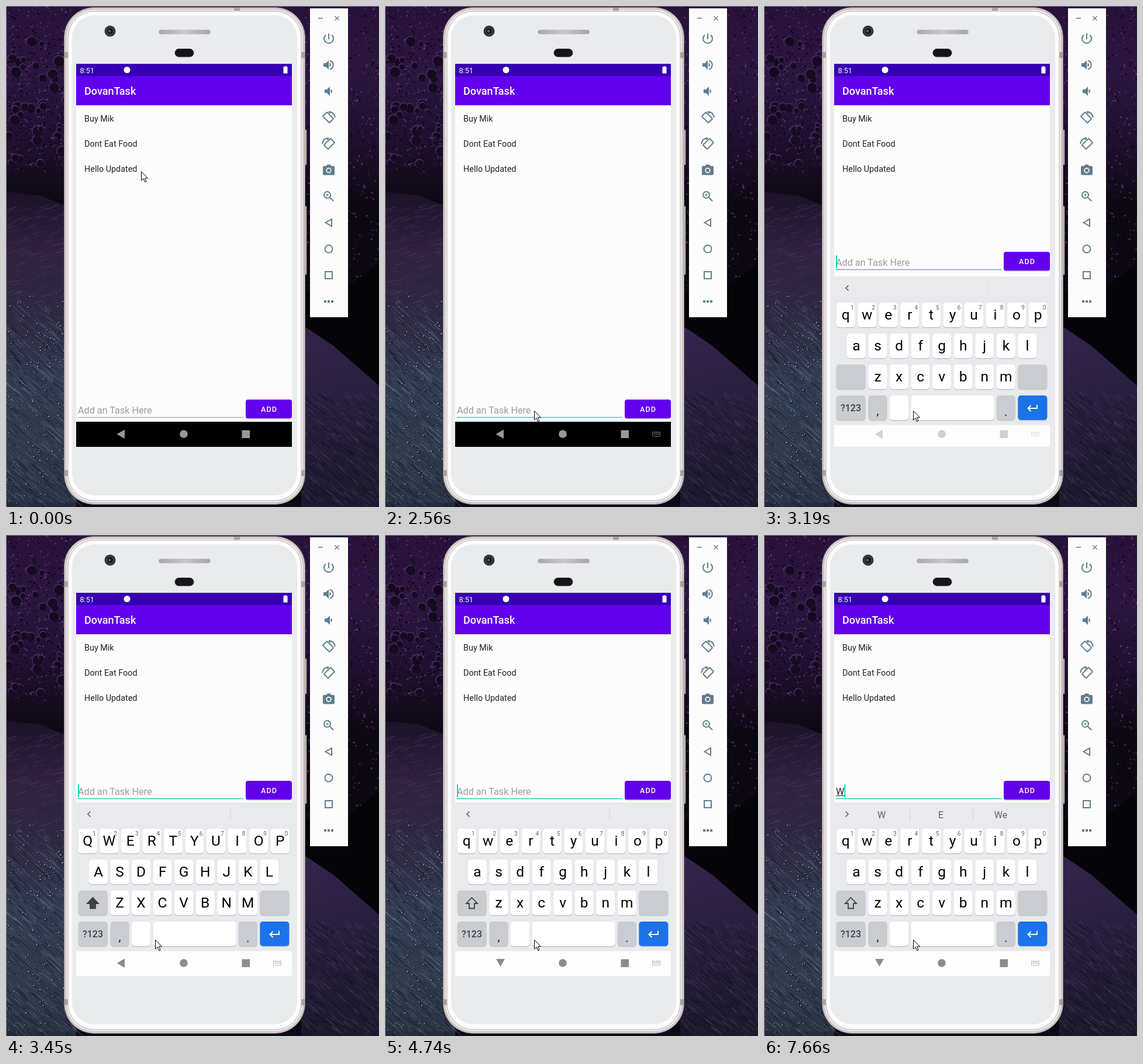
An HTML page with a canvas that plays this animation: 638 by 858 pixels, repeating every 8000 ms.

```html
<!DOCTYPE html>
<html lang="en">
<head>
<meta charset="utf-8">
<title>To-do app in a phone emulator</title>
<style>
html, body { margin: 0; width: 100%; height: 100%; overflow: hidden; background: #150c20; }
canvas, svg { position: absolute; left: 0; top: 0; width: 638px; height: 858px; }
svg { font-family: Roboto, sans-serif; }
.mid { text-anchor: middle; }
.list { font-size: 14.4px; fill: #212121; }
.letter { font-size: 24.5px; fill: #000; }
.digit { font-size: 10px; fill: #5f6368; }
.key { fill: #fff; }
.alt { fill: #caccd2; }
.go { fill: #1a73e8; }
.shadow { fill: #c3c5c9; }
.ghost .board, .ghost .shadow, .ghost .strip-line { opacity: 0; }
.ghost .key { fill: #000; opacity: .13; }
.ghost .digit { fill: #0b0b0b; }
.ghost .chevron { opacity: .3; }
.line { fill: none; stroke: #607d8b; stroke-width: 2; }
.solid { fill: #607d8b; }
</style>
</head>
<body>
<canvas id="wall" width="638" height="858"></canvas>
<svg viewBox="0 0 638 858">
  <defs>
    <linearGradient id="grille"><stop stop-color="#aaa6ad"/><stop offset=".5" stop-color="#c9c8cf"/><stop offset="1" stop-color="#a5a3a8"/></linearGradient>
    <clipPath id="screen"><rect x="120" y="99" width="369" height="656"/></clipPath>
  </defs>

  <g id="phone">
    <path d="M511 212h3v60h-3zM511 343h3v117h-3z" fill="#d8d3d2" stroke="#777174"/>
    <rect x="99.5" y="2.5" width="412" height="851" rx="51" fill="#d5cfcd" stroke="#8c8584"/>
    <rect x="102.5" y="5.5" width="406" height="845" rx="48" fill="#eeeaea" stroke="#c0b8b6"/>
    <path d="M100 79h6v10h-6zM505 79h6v10h-6zM100 795h6v10h-6zM505 795h6v10h-6zM390 3h10v5h-10z" fill="#a7a1a0"/>
    <rect x="106" y="9" width="399" height="838" rx="45" fill="#fdfdfd" stroke="#b9b1af"/>
    <rect x="113" y="16" width="385" height="822" rx="38" fill="#e9ebec"/>
    <circle cx="178" cy="43" r="9.5" fill="#30343a"/>
    <circle cx="178" cy="43" r="6" fill="#15181d" stroke="#555b64"/>
    <circle cx="177" cy="43" r="2.2" fill="#53647c"/>
    <rect x="261" y="40.5" width="89" height="8" rx="4" fill="url(#grille)" stroke="#d9d9db"/>
    <rect x="289" y="73.5" width="32" height="13.5" rx="6.7" fill="#14141a" stroke="#343238"/>
  </g>

  <g clip-path="url(#screen)">
    <path d="M120 99h369v656H120z" fill="#fcfcfc"/>
    <path d="M120 99h369v21H120z" fill="#3700b3"/>
    <path d="M120 120h369v50H120z" fill="#6200ee"/>
    <g fill="#fff">
      <text x="126.5" y="114.5" font-size="12.6">8:51</text>
      <circle cx="207" cy="109.5" r="5.5"/>
      <path d="M476.500 103h3v1.300h2v11.200h-7v-11.200h2z"/>
      <text x="134" y="152" font-size="18" font-weight="500">DovanTask</text>
    </g>
    <g class="list">
      <text x="134" y="197.500">Buy Mik</text>
      <text x="134" y="240.500">Dont Eat Food</text>
      <text x="134" y="283.500">Hello Updated</text>
    </g>

    <g id="field" font-size="16.2">
      <text id="hint" x="123" y="444.500" fill="#9c9c9c">Add an Task Here</text>
      <text id="typed" x="123" y="444.500" fill="#212121"></text>
      <path id="spell" stroke="#212121"/>
      <path id="underline" d="M123 451.500H406"/>
      <rect id="caret" y="427" width="2" height="22" fill="#03dac5"/>
      <rect x="410" y="422" width="79" height="32.500" rx="4" fill="#b9b5c4"/>
      <rect x="410" y="421" width="79" height="32" rx="4" fill="#6200ee"/>
      <text class="mid" x="450" y="441.500" font-size="12.6" font-weight="500" letter-spacing="1.1" fill="#fff">ADD</text>
    </g>

    <path id="navbar" d="M120 712h369v43H120z"/>
    <g id="keyboard">
      <path class="board" d="M120 458h369v254.500H120z" fill="#e8eaed"/>
      <path class="chevron" id="chevron" fill="none" stroke="#5f6368" stroke-width="1.700"/>
      <path class="strip-line" id="dividers" stroke="#d0d2d6"/>
      <g id="words" font-size="16" fill="#5f6368">
        <text class="mid" x="201" y="484.500"></text>
        <text class="mid" x="302.500" y="484.500"></text>
        <text class="mid" x="405" y="484.500"></text>
      </g>
      <g id="keys"></g>
      <path id="shift" d="M148.500 621l9.500 10h-5v8.500h-9V631h-5z" stroke="#3c4043" stroke-width="1.800"/>
      <text class="mid" x="148.500" y="689" font-size="16" font-weight="500" fill="#3c4043">?123</text>
      <path d="M467 678v6H452M456.500 679l-5 5 5 5" fill="none" stroke="#fff" stroke-width="1.900"/>
    </g>
    <g id="navicons">
      <path id="back"/>
      <circle cx="304" cy="733" r="6.800"/>
      <path d="M403.500 726.500h13.500v13.500h-13.500z"/>
    </g>
    <path id="switcher" d="M457 730h14M457 733h14M457 736h2M461 737h7M469 736h2" stroke-width="1.500" stroke-dasharray="2 1"/>
  </g>

  <g id="toolbar">
    <path d="M520 4h65v529h-65z" fill="#fcfcfc"/>
    <path class="line" stroke-width="1.500" d="M534 21h8M562.500 17.500l7 7m0-7l-7 7" style="stroke-width:1.400"/>
    <path class="line" d="M552 47v10M547 49.500a8 8 0 1 0 10 0"/>
    <g id="speaker"><path class="solid" d="M543 98h4l5-5v16l-5-5h-4z"/><path class="solid" d="M553.500 97q5 4 0 8z"/></g>
    <path class="line" d="M554 93.500a7.800 7.800 0 0 1 0 15"/>
    <use href="#speaker" x="2" y="45"/>
    <g id="rotate" class="line">
      <rect x="-5" y="-8" width="10" height="16" rx="1" transform="translate(551 191) rotate(-45)"/>
      <path d="M552 181q9 0 11 10M552 181l3 3"/>
    </g>
    <use href="#rotate" transform="translate(1104 45) scale(-1 1)"/>
    <path class="solid" d="M544 274h3.500l2-2.500h5l2 2.500h3.500q2 0 2 2v11.500q0 2-2 2h-16q-2 0-2-2V276q0-2 2-2z"/>
    <circle cx="552" cy="281.500" r="3.800" fill="#607d8b" stroke="#fcfcfc" stroke-width="1.700"/>
    <path class="line" d="M554 328l6 6"/>
    <circle class="line" cx="549.500" cy="323.500" r="5.500"/>
    <path class="line" style="stroke-width:1.200" d="M547 323.500h5m-2.500-2.500v5"/>
    <path class="line" d="M557 365v12l-10.500-6z"/>
    <circle class="line" cx="552" cy="416" r="6.500"/>
    <path class="line" d="M546 455h12v12h-12z"/>
    <path class="solid" d="M544 504h4v4h-4zM550 504h4v4h-4zM556 504h4v4h-4z"/>
  </g>

  <path id="cursor" d="M.5.5v15.500l3.600-3.400 2.600 6 2.300-1-2.500-5.800h5z" fill="#fff" stroke="#000"/>
</svg>

<script>
const $ = id => document.getElementById(id);
const set = (id, attrs) => { for (const name in attrs) $(id).setAttribute(name, attrs[name]); };

function paintWall() {
  const c = $('wall').getContext('2d');
  let seed = 7;
  const rnd = (a = 0, b = 1) => {
    seed = (seed * 16807) % 2147483647;
    return a + (b - a) * seed / 2147483647;
  };
  const area = (points, fill) => {
    c.beginPath();
    points.forEach(p => c.lineTo(...p));
    c.fillStyle = fill;
    c.fill();
  };
  const fade = (x0, y0, x1, y1, ...colours) => {
    const g = c.createLinearGradient(x0, y0, x1, y1);
    colours.forEach((colour, i) => g.addColorStop(i / (colours.length - 1), colour));
    return g;
  };
  const dot = (x, y, r, colour) => {
    c.beginPath();
    c.arc(x, y, r, 0, 7);
    c.fillStyle = colour;
    c.fill();
  };
  const streaks = (count, x0, x1, y0, y1, slope, colour) => {
    c.strokeStyle = colour;
    for (let i = 0; i < count; i++) {
      const x = rnd(x0, x1), y = rnd(y0, y1), w = rnd(4, 22);
      c.lineWidth = rnd(.4, 1.3);
      c.beginPath();
      c.moveTo(x, y);
      c.lineTo(x + w, y + w * slope);
      c.stroke();
    }
  };

  area([[0, 0], [638, 0], [638, 858], [0, 858]], fade(0, 0, 0, 340, '#28123a', '#2b1640', '#211030', '#0c0812'));
  // foam on both sides
  for (let i = 0; i < 1500; i++) {
    const right = i % 2, x = right ? rnd(512, 638) : rnd(0, 115);
    dot(x, rnd(0, right ? 480 : 290), rnd(.4, 1.8), rnd() < .5 ? '#0d0715' : `hsla(${rnd(272, 292)},40%,${rnd(25, 52)}%,.6)`);
  }
  for (let i = 0; i < 45; i++) {
    const x = rnd(0, 105), y = rnd(60, 275), r = rnd(2, 9);
    dot(x, y, r + 1, '#4a2c62');
    dot(x + .5, y + .8, r, '#160b20');
  }
  // wet metal, lower left
  area([[0, 318], [60, 325], [120, 350], [120, 858], [0, 858]],
    fade(0, 320, 30, 858, '#1c1229', '#30213f', '#2d2840', '#323c50', '#303b4d', '#293344'));
  streaks(170, -10, 115, 340, 510, -.32, 'rgba(105,80,140,.3)');
  streaks(520, -10, 115, 500, 858, .9, 'rgba(125,143,168,.33)');
  streaks(300, -10, 115, 540, 858, .9, 'rgba(8,12,24,.5)');
  for (let i = 0; i < 260; i++) {
    const x = rnd(0, 110), y = rnd(490, 858), r = rnd(.5, 2.4);
    dot(x, y, r, '#151c2a');
    dot(x - .5, y - .5, r * .5, '#a9b8cb');
  }
  // dark gap and brushed surface, lower right
  area([[505, 490], [580, 485], [638, 440], [638, 660], [505, 545]], '#050409');
  area([[505, 545], [560, 582], [638, 650], [638, 858], [505, 858]],
    fade(512, 560, 600, 858, '#33244d', '#2b2040', '#221b34', '#1b1b2c'));
  streaks(260, 500, 638, 660, 858, .85, 'rgba(105,94,145,.32)');
  streaks(150, 500, 638, 660, 858, .85, 'rgba(5,4,14,.5)');
  area([[0, 850], [638, 850], [638, 858], [0, 858]], 'rgba(20,20,35,.25)');
  c.fillStyle = '#8b878d';
  c.fillRect(0, 0, 1, 858);
  c.fillRect(0, 0, 638, 1);
}

function buildKeys() {
  const pitch = 36.55;
  let out = '';
  const key = (x, y, w, kind = '') => {
    out += `<rect class="shadow" x="${x}" y="${y + 1}" width="${w}" height="42.5" rx="5"/>
      <rect class="key ${kind}" x="${x}" y="${y}" width="${w}" height="42" rx="5"/>`;
  };
  [['qwertyuiop', 123.7], ['asdfghjkl', 142], ['zxcvbnm', 178.5]].forEach(([letters, left], row) => {
    const y = 503 + row * 53;
    [...letters].forEach((letter, i) => {
      const x = left + i * pitch;
      key(x, y, 32);
      out += `<text class="letter mid" data-letter="${letter}" x="${x + 16}" y="${y + 29}">${letter}</text>`;
      if (!row) out += `<text class="digit mid" x="${x + 27}" y="${y + 11.5}">${(i + 1) % 10}</text>`;
    });
  });
  key(123.7, 609, 50, 'alt');
  key(434.4, 609, 50, 'alt');
  key(123.7, 662, 50, 'alt');
  key(178.5, 662, 32, 'alt');
  key(215, 662, 32);
  key(251.6, 662, 142);
  key(397.8, 662, 32, 'alt');
  key(434.4, 662, 50, 'go');
  out += '<g font-size="21" fill="#202124"><text class="mid" x="194.5" y="695">,</text><text class="mid" x="413.8" y="697">.</text></g>';
  $('keys').innerHTML = out;
}

// Each track lists [start time, value...]; a value holds until the next start.
const cursorTrack = [[0, 231, 283], [140, 229, 460], [290, 273, 656], [540, 273, 688], [790, 273, 689],
  [940, 271, 689], [1090, 265, 693], [1490, 260, 693], [1630, 259, 693], [1880, 258, 693], [2030, 255, 693]];
const textTrack = [[0, ''], [3870, 'N'], [4740, ''], [7410, 'W']];
const wordTrack = [[0, ''], [4250, 'N No Not'], [4740, ''], [7660, 'W E We']];
const caretToggles = [2150, 2560, 3070, 3590, 3870, 5240, 5670, 6170, 6730, 7130, 7410];
const at = (track, t) => track.findLast(step => step[0] <= t).slice(1);
const letters = () => document.querySelectorAll('[data-letter]');

function draw(t) {
  const [text] = at(textTrack, t), [words] = at(wordTrack, t);
  const focused = t >= 2150, raised = t >= 3070, ghost = raised && t < 3190;
  const settled = t >= 3330, caps = t >= 3450 && t < 3990;
  const caretOn = caretToggles.filter(start => start <= t).length % 2;

  set('cursor', { transform: `translate(${at(cursorTrack, t)})` });
  set('field', { transform: `translate(0 ${raised ? 0 : 253})` });
  $('hint').style.display = text ? 'none' : '';
  $('typed').textContent = text;
  const width = text ? $('typed').getComputedTextLength() : 0;
  set('caret', { x: 123 + width, visibility: caretOn ? 'visible' : 'hidden' });
  set('spell', { d: words ? `M123 446.500h${width}` : '' });
  set('underline', { stroke: focused ? '#2bcfc0' : '#949494', 'stroke-width': focused ? 1.6 : 1 });

  set('keyboard', {
    class: ghost ? 'ghost' : '',
    visibility: raised ? 'visible' : 'hidden',
    transform: `translate(0 ${ghost ? 217 : settled ? 0 : 5})`
  });
  set('chevron', { d: words ? 'M139.500 473.500l4.500 4.500-4.500 4.500' : 'M144.500 473.500l-4.500 4.500 4.500 4.500' });
  set('dividers', { d: words ? 'M249.500 467v22M357.500 467v22' : 'M384 468v20' });
  const list = words.split(' ');
  [...$('words').children].forEach((node, i) => node.textContent = list[i] || '');
  set('shift', { fill: caps ? '#3c4043' : 'none', visibility: settled ? 'visible' : 'hidden' });
  for (const node of letters()) {
    const { letter } = node.dataset;
    node.textContent = caps ? letter.toUpperCase() : letter;
  }

  set('navbar', { fill: !raised ? '#000' : ghost ? '#272727' : '#fdfdfd' });
  set('navicons', { fill: !raised || ghost ? '#999' : settled ? '#8c8c8c' : '#d0d0d0' });
  set('back', { d: t >= 3590 ? 'M190 726h15l-7.500 13z' : 'M203 725.500v15.500l-13.500-7.700z' });
  set('switcher', { stroke: settled || ghost ? '#a5a5a5' : raised ? '#d6d6d6' : '#8c8c8c', visibility: t >= 2560 ? 'visible' : 'hidden' });
}

paintWall();
buildKeys();
const frame = () => {
  draw(performance.now() % 8000);
  requestAnimationFrame(frame);
};
frame();
</script>
</body>
</html>
```
